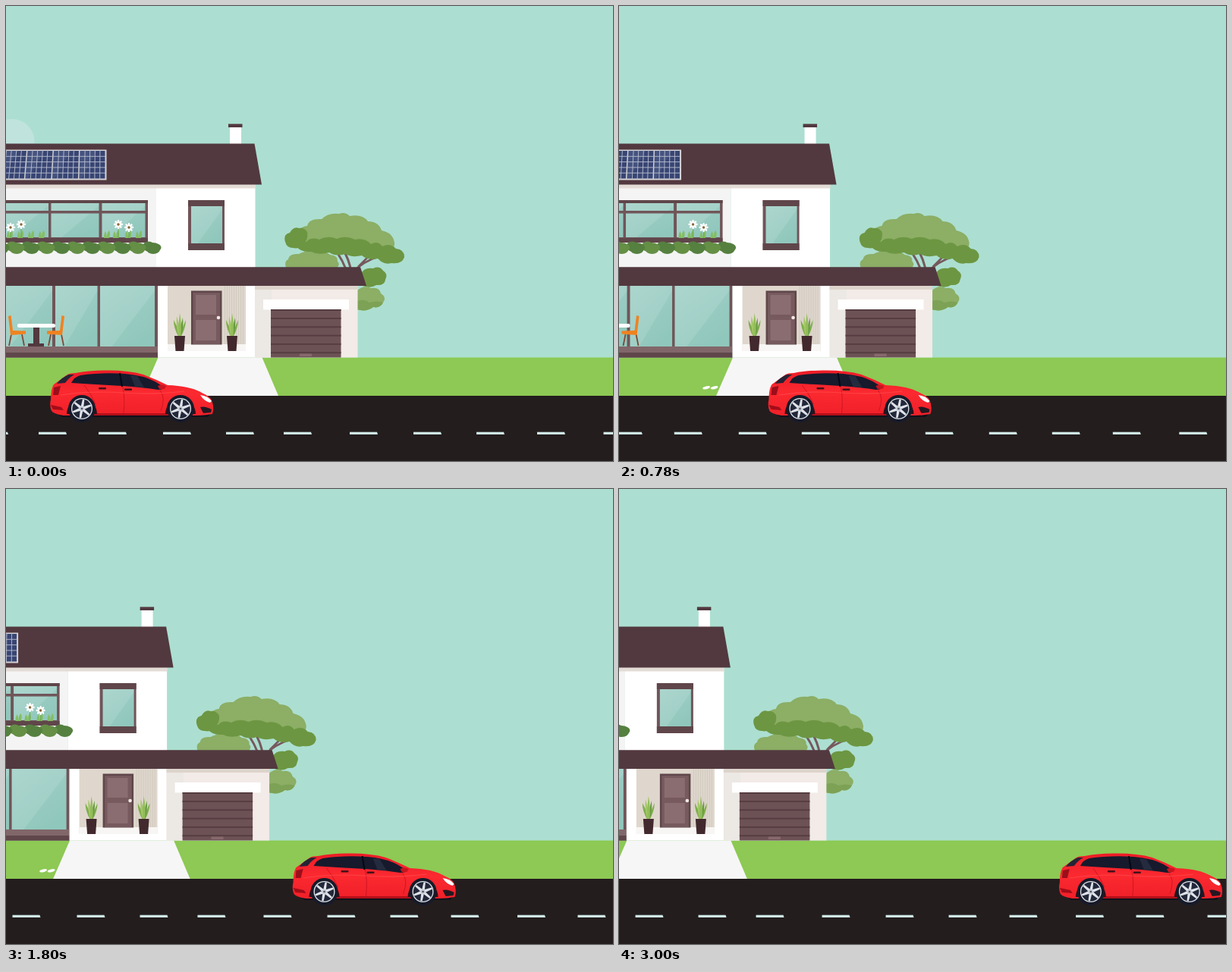
Write an HTML page that moves like this. It is 800 px wide and 600 px high and loops after 3.12 s.

```html
<!DOCTYPE html>
<html lang="en">
<head>
<meta charset="utf-8">
<title>Drive by the house</title>
<style>
html, body { margin: 0; width: 100%; height: 100%; overflow: hidden; background: #acdfd1; }
svg { display: block; width: 800px; height: 600px; }
</style>
</head>
<body>
<svg viewBox="0 0 800 600">
  <defs>
    <linearGradient id="glass" x1="0" y1="0" x2=".6" y2="1">
      <stop offset="0" stop-color="#a3d1c8"/><stop offset="1" stop-color="#90c7bc"/>
    </linearGradient>
    <linearGradient id="paint" x1="0" y1="0" x2="0" y2="1">
      <stop offset="0" stop-color="#ee1c27"/><stop offset=".5" stop-color="#fb2930"/><stop offset="1" stop-color="#f02029"/>
    </linearGradient>
  </defs>
  <rect width="800" height="600" fill="#acdfd1"/>
  <rect y="463.5" width="800" height="51" fill="#8dc954"/>
  <rect y="514" width="800" height="86" fill="#231d1e"/>
  <g id="house"></g>
  <g id="road"></g>
  <g id="car"></g>
</svg>
<script>
const ROOF = '#52393f', FRAME = '#705559', DARK = '#5f464a', LEAF = '#6d9642', PALE = '#8cae65';

const rect = (x, y, w, h, fill, extra = '') =>
  `<rect x="${x}" y="${y}" width="${w}" height="${h}" fill="${fill}" ${extra}/>`;
const poly = (points, fill, extra = '') => `<polygon points="${points}" fill="${fill}" ${extra}/>`;
const path = (d, fill, extra = '') => `<path d="${d}" fill="${fill}" ${extra}/>`;
const line = (d, stroke, width, extra = '') => path(d, 'none', `stroke="${stroke}" stroke-width="${width}" ${extra}`);
const oval = (x, y, rx, ry, fill, extra = '') => `<ellipse cx="${x}" cy="${y}" rx="${rx}" ry="${ry}" fill="${fill}" ${extra}/>`;
const many = (n, draw) => Array.from({ length: n }, (_, i) => draw(i)).join('');

function pane(x, y, w, h) {
  const right = x + w, low = y + h;
  return rect(x, y, w, h, 'url(#glass)') +
    poly(`${x},${y} ${right},${y} ${right},${y + h * .08} ${x + w * .22},${low} ${x},${low}`, '#c6e4de', 'opacity=".22"');
}

function flower(x, y) {
  return line(`M${x} ${y}V306`, '#6fae4d', 1.2) +
    many(8, i => oval(x, y - 3.7, 1.4, 2.6, '#fff', `transform="rotate(${i * 45} ${x} ${y})"`)) +
    oval(x, y, 1.7, 1.7, '#8a6a3a');
}

const tuft = x => path(`M${x - 5} 306q0-6 2-9q2 4 2 9zM${x - 1} 306q0-8 3-10q2 5 0 10z`, '#84bd62');

function plant(x) {
  const leaf = (dx, top, fill) =>
    path(`M${x - 1.5} 436Q${x + dx * .7 - 2.5} ${(436 + top) / 2} ${x + dx} ${top}Q${x + dx * .6 + 3} ${(436 + top) / 2} ${x + 1.5} 436z`, fill);
  return leaf(-8, 414, '#7fae4c') + leaf(8, 414, '#7fae4c') + leaf(-4, 409, '#a3c765') +
    leaf(4, 411, '#679a42') + leaf(0, 405, '#93bd5a') +
    poly(`${x - 7},435 ${x + 7},435 ${x + 5.5},455 ${x - 5.5},455`, '#42292e');
}

function chair(x, dir) {
  const at = (dx, y) => `${x + dx * dir} ${y}`;
  return line(`M${at(3, 433)}L${at(0, 448)}M${at(17, 433)}L${at(20, 448)}`, '#7d4a38', 1.8) +
    path(`M${at(-1, 409)}L${at(2.5, 408)}L${at(5, 428)}L${at(22, 428.5)}V432.5L${at(2, 434)}z`, '#f0821f');
}

function solarPanels() {
  const lean = x => x - (132 - x) * .03;
  const slant = (x, color, width) => line(`M${x} 190L${lean(x)} 229`, color, width);
  return poly('-10,189.5 132.5,189.5 132.5,229.5 -10,229.5', '#d3d2d4') +
    many(4, i => {
      const x = 97.5 - i * 34.5;
      return poly(`${x},191 ${x + 33},191 ${lean(x + 33)},227.5 ${lean(x)},227.5`, '#384573') +
        poly(`${x},191 ${x + 22},191 ${lean(x + 3)},227.5 ${lean(x)},227.5`, '#65739c', 'opacity=".3"') +
        many(4, k => slant(x + 6.6 * (k + 1), '#b9bfd0', .9));
    }) +
    many(4, i => line(`M-10 ${198.3 + i * 7.3}H131`, '#b9bfd0', .9));
}

function tree() {
  return line('M455 372Q450 345 437 326M456 360Q455 342 447 326', '#76595d', 3) +
    line('M456 352Q470 337 492 330M464 344L478 330', '#76595d', 2.5) +
    path('M369 345Q366 337 372 334Q373 326 386 327Q396 321 407 325Q420 322 427 328Q438 329 437 337Q441 340 436 346z', PALE) +
    path('M383 306Q384 291 397 290Q399 280 416 281Q425 272 439 274Q447 271 453 277Q470 274 477 284Q491 284 495 296Q510 299 512 312Q513 322 500 322H390Q378 318 383 306z', PALE) +
    path('M368 311Q365 301 374 299Q379 290 386 293Q393 292 397 298Q399 307 392 314Q388 321 378 319Q370 319 368 311z', LEAF) +
    path('M383 317Q387 310 396 311Q402 304 413 308Q424 302 436 307Q448 302 460 308Q473 305 481 314Q490 309 496 317Q507 312 514 320Q525 321 525 331Q522 341 508 339Q498 342 490 333Q477 336 469 329Q456 332 447 327Q435 331 426 325Q412 329 402 324Q388 325 383 317z', LEAF) +
    path('M468 353Q472 344 484 346Q492 342 497 349Q504 353 500 361Q499 369 488 368Q480 373 470 369z', LEAF) +
    path('M462 376Q471 367 481 372Q492 370 494 379Q502 384 497 391Q493 399 484 397Q475 404 462 400z', PALE) +
    path('M462 390Q471 385 479 391Q489 388 497 391Q493 399 484 397Q475 404 462 400z', '#7da255');
}

function upperFloor() {
  return rect(295, 159, 15, 23, '#fff') + rect(293, 155.5, 18.5, 4.5, ROOF) +
    rect(-10, 236, 208, 110, '#f4f4f4') + rect(198, 236, 130.5, 110, '#fff') +
    rect(-10, 235, 339, 5.5, '#e3dcd6') + poly('-10,181.5 327.5,181.5 337,235.5 -10,235.5', ROOF) +
    solarPanels() +
    rect(240, 256, 48, 66, FRAME) + rect(240, 256, 48, 8, DARK) + rect(240, 313, 48, 9, DARK) + pane(244, 264, 41, 49) +
    rect(-10, 256, 197, 56, FRAME) +
    pane(-10, 260, 66, 45) + pane(59.5, 260, 63, 45) + pane(126.5, 260, 57, 45) +
    rect(-10, 270, 194, 3.5, FRAME) + rect(-10, 256, 197, 4, DARK) + rect(-10, 306, 197, 6, DARK) +
    [6, 20, 34, 48, 134, 146, 162, 176].map(tuft).join('') +
    flower(6, 292) + flower(20, 288) + flower(148, 288) + flower(162, 292) +
    many(11, i => {
      const x = 193 - i * 20, fill = i % 2 ? '#648f45' : '#55803f';
      return oval(x, 318.5, 11.5, 6.5, fill) + oval(x - 5, 317, 8, 6.5, fill) + oval(x + 1, 321, 9, 6, fill);
    });
}

function groundFloor() {
  return rect(-10, 368, 210, 95.5, FRAME) +
    pane(-10, 369, 71, 80) + pane(65, 369, 55.5, 80) + pane(124, 369, 72, 80) +
    rect(-10, 449, 210, 8, '#81676a') + rect(-10, 457, 210, 6.5, DARK) +
    chair(4, 1) + chair(76, -1) +
    rect(36, 423, 8, 24, ROOF) + rect(29, 445, 21, 4, ROOF) + rect(15, 419, 50, 5, '#fff', 'rx="2"') +
    rect(200, 368, 129, 95.5, '#fff') + rect(213, 369, 103, 86, '#dfd7cd') +
    many(9, i => rect(288 + i * 3, 369, 1, 77, '#d1cabf')) + rect(213, 446, 103, 9, '#f8f6f4') +
    rect(244, 375.5, 40.5, 71, DARK) + rect(246.5, 378, 35.5, 68, '#765a5e') +
    rect(250, 381, 27, 26, '#8a6d70') + rect(250, 414, 27, 27, '#8a6d70') + oval(280, 411, 2.3, 2.3, '#f2e9e4') +
    plant(229) + plant(298) +
    rect(328, 368, 135.5, 95.5, '#f2ebe7') + rect(328, 368, 22, 95.5, '#ece8e4') + rect(328, 368, 135.5, 6, '#ddd4cc') +
    rect(339, 387, 113, 13.5, '#fff') + rect(349, 400, 92.5, 63.5, '#6d5255') +
    rect(349, 400, 92.5, 2, '#563d42') + many(5, i => rect(349, 411 + i * 11.3, 92.5, 2, '#563d42')) +
    rect(387, 458.5, 16, 3.5, '#87696b') +
    poly('-10,344.3 467,344.3 475,369 -10,369', ROOF) +
    poly('200.5,463.5 337.5,463.5 359,514 178.5,514', '#f6f6f6') +
    oval(165.5, 503.3, 5, 1.9, '#fff', 'transform="rotate(-14 165.5 503.3)"') +
    oval(176, 503.3, 5, 1.9, '#fff', 'transform="rotate(-14 176 503.3)"');
}

function wheel(x) {
  return oval(x, 531, 18, 18, '#171a29') + oval(x, 531, 14, 14, '#dfe3e9') + oval(x, 531, 12.7, 12.7, '#22273a') +
    many(6, i => path(`M${x - 2} 531L${x - 1.2} 518.500h2.4L${x + 2} 531z`, '#dfe3e9', `transform="rotate(${i * 60 + 10} ${x} 531)"`)) +
    oval(x, 531, 3, 3, '#c3c8d2') + oval(x, 531, 1.3, 1.3, '#4a5061');
}

function car() {
  return path('M66 537H270L266 542H74z', '#12111a') +
    path('M59 519Q59 505 63 499L81 486Q84 484 92 484Q108 480.500 130 480.500Q161 480 181 486Q197 492 213 500Q243 501 258 510Q269 515 271 520Q275 529 272 538Q262 540 250 540H76Q63 538 60 534Q57 527 59 519z', 'url(#paint)') +
    path('M67 498Q73 490 83 486L90 486Q83 490 78 497z', '#242536') +
    path('M86 497Q90 489 98 487Q125 483 157 485Q181 487 196 495L209 503Q207 506 200 506Q181 503 153 501Q116 499 86 497z', '#161a2c') +
    path('M164 487L170 502L182 503L173 488z', '#343b50', 'opacity=".5"') +
    line('M150 484L153 502', '#050913', 2) +
    path('M200 501Q205 498 211 501L209 505H202z', '#c8141f') +
    line('M154 502Q157 518 155 537M103 500Q112 511 118 525M203 507Q211 516 204 534', '#c5121e', .8) +
    line('M72 513Q111 507 154 510T235 508', '#ff4e4d', 1.2, 'opacity=".7"') +
    path('M63 503L72 501L69 513L62 513z', '#9b0e1a') + path('M59 526L73 529L76 533L62 532z', '#a30d18') +
    path('M116 537H214L216 540H114z', '#b60f1a') +
    rect(122, 503, 10, 2.5, '#451019', 'rx="1"') + rect(156, 504.5, 10, 2.5, '#451019', 'rx="1"') +
    path('M256 513Q266 514 271 521L269 523Q261 521 256 513z', '#fff') +
    path('M256 529Q262 527 271 532L270 536L260 537z', '#251821') +
    [100, 230].map(x => path(`M${x - 20} 538A20 20 0 0 1 ${x + 20} 538z`, '#311018') + wheel(x)).join('');
}

const dashStarts = [-34, 43, 122, 207, 290, 366, 453, 537, 620, 700, 787.5, 867, 961];
const layers = { house: 0, road: 0, car: 0 };
for (const id in layers) layers[id] = document.getElementById(id);

layers.house.innerHTML = oval(8, 178.5, 29.5, 29.5, '#c0e3dd') + tree() + upperFloor() + groundFloor();
layers.road.innerHTML = dashStarts.map(x => poly(`${x},561.7 ${x + 36},561.7 ${x + 37},565 ${x},565`, '#cfe7e4')).join('');
layers.car.innerHTML = car();

const LOOP = 3120, STEP = 30;
const speed = { house: -1.94, road: -1.892, car: 5.325 };

// Steady drive that brakes over the last four steps.
function travel(step) {
  if (step <= 96) return step;
  const u = Math.min((step - 96) / 4, 1);
  return 96 + 2 * (1 - (1 - u) ** 2);
}

function render(now) {
  const distance = travel(Math.min(Math.floor(now % LOOP / STEP), 100));
  for (const id in layers) layers[id].setAttribute('transform', `translate(${(speed[id] * distance).toFixed(2)} 0)`);
}

let start;
function tick(now) {
  start ??= now;
  render(now - start);
  requestAnimationFrame(tick);
}
render(0);
requestAnimationFrame(tick);
</script>
</body>
</html>
```
